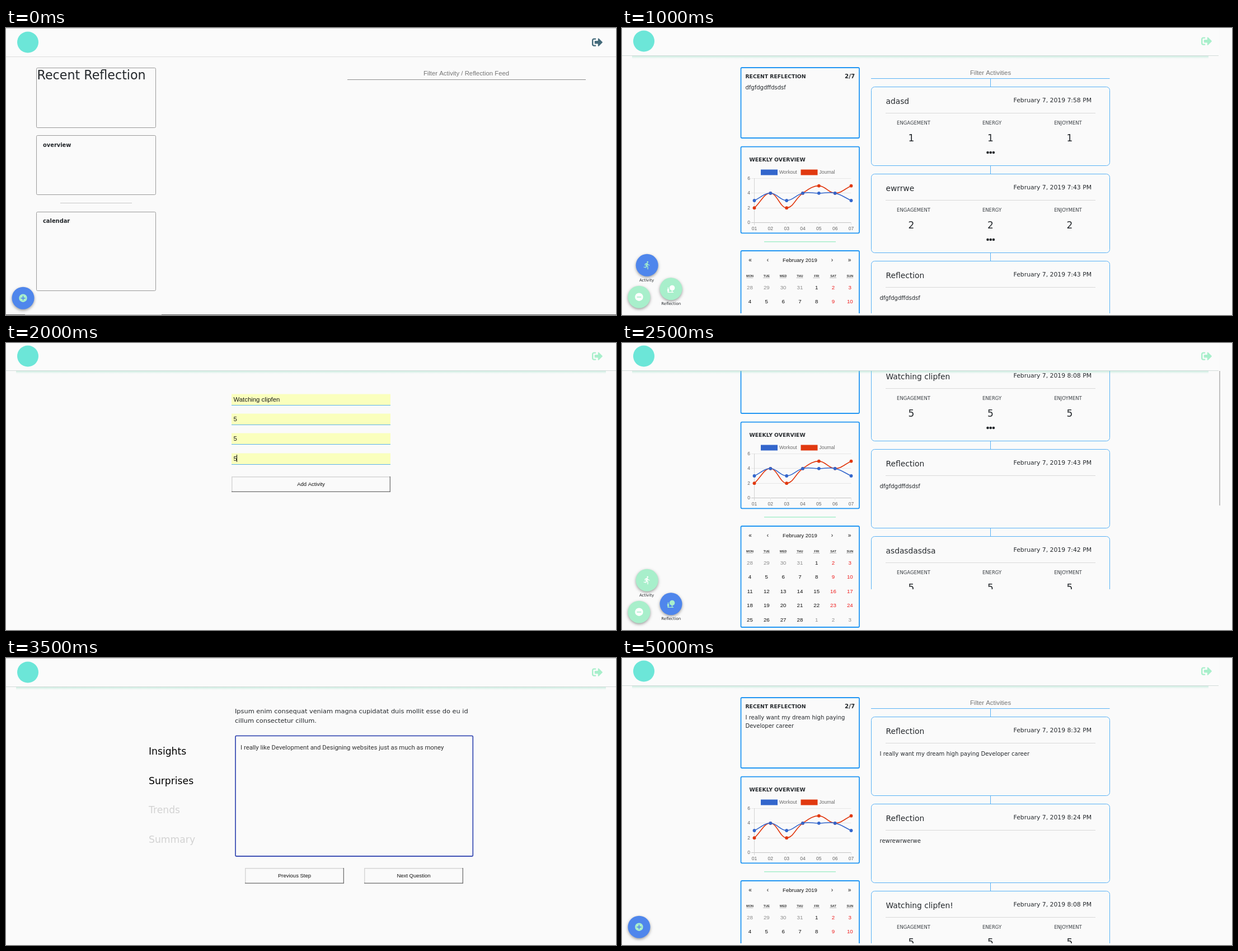
Animation, 1090 px wide and 514 px high, one loop 5500 ms. Source, as an HTML page with a canvas:

```html
<!DOCTYPE html>
<html lang="en">
<head>
<meta charset="utf-8">
<title>Reflection journal</title>
<style>
  html, body { margin: 0; width: 100%; height: 100%; overflow: hidden; background: #fafafa; }
  canvas { display: block; }
</style>
</head>
<body>
<canvas id="stage" width="1090" height="514"></canvas>
<script>
const ctx = document.getElementById('stage').getContext('2d');
const W = 1090, H = 514, STEP = 500, LOOP = 5500;
const BG = '#fafafa', INK = '#24282c', MINT = '#a8efcb', BLUE = '#4f86ec', EDGE = '#2196f3', THIN = '#58b1f5';
const VERDANA = '"DejaVu Sans", Verdana, sans-serif';
const ARIAL = '"Liberation Sans", Arial, sans-serif';
const ROBOTO = 'Roboto, sans-serif';

const LOGOUT = new Path2D('M497 273L329 441c-15 15-41 4.500-41-17v-96H152c-13.300 0-24-10.700-24-24v-96c0-13.300 10.700-24 24-24h136V88c0-21.400 25.900-32 41-17l168 168c9.300 9.400 9.300 24.600 0 34zM192 436v-40c0-6.600-5.400-12-12-12H96c-17.700 0-32-14.300-32-32V160c0-17.700 14.300-32 32-32h84c6.600 0 12-5.400 12-12V76c0-6.600-5.400-12-12-12H96c-53 0-96 43-96 96v192c0 53 43 96 96 96h84c6.600 0 12-5.400 12-12z');
const RUNNER = new Path2D('M13.490 5.480c1.100 0 2-.9 2-2s-.9-2-2-2-2 .9-2 2 .9 2 2 2zm-3.600 13.900l1-4.400 2.100 2v6h2v-7.500l-2.100-2 .6-3c1.300 1.500 3.300 2.500 5.500 2.500v-2c-1.900 0-3.500-1-4.300-2.400l-1-1.600c-.4-.6-1-1-1.700-1-.3 0-.5.1-.8.1l-5.200 2.200v4.700h2v-3.400l1.800-.7-1.600 8.100-4.900-1-.4 2 7 1.400z');
const TREE = new Path2D('M22.170 9.170c0-3.870-3.130-7-7-7s-7 3.130-7 7c0 3.470 2.520 6.340 5.830 6.890V20H6v-3h1v-4c0-.55-.45-1-1-1H3c-.55 0-1 .45-1 1v4h1v5h16v-2h-3v-3.880c3.470-.41 6.170-3.360 6.170-6.950zM4.500 11c.83 0 1.500-.67 1.500-1.500S5.330 8 4.500 8 3 8.670 3 9.500 3.670 11 4.500 11z');

function text(str, x, y, size, { family = VERDANA, color = INK, align = 'left', weight = 'normal' } = {}) {
  ctx.font = `${weight} ${size}px ${family}`;
  ctx.fillStyle = color;
  ctx.textAlign = align;
  ctx.fillText(str, x, y);
}

function rect(x, y, w, h, color) {
  ctx.fillStyle = color;
  ctx.fillRect(x, y, w, h);
}

function line(x1, y1, x2, y2, color, width = 1) {
  ctx.strokeStyle = color;
  ctx.lineWidth = width;
  ctx.beginPath();
  ctx.moveTo(x1, y1);
  ctx.lineTo(x2, y2);
  ctx.stroke();
}

function box(x, y, right, bottom, color, width, radius) {
  ctx.strokeStyle = color;
  ctx.lineWidth = width;
  ctx.beginPath();
  ctx.roundRect(x, y, right - x, bottom - y, radius);
  ctx.stroke();
}

function disc(x, y, r, color) {
  ctx.fillStyle = color;
  ctx.beginPath();
  ctx.arc(x, y, r, 0, Math.PI * 2);
  ctx.fill();
}

function icon(path, x, y, scale, color) {
  ctx.save();
  ctx.translate(x, y);
  ctx.scale(scale, scale);
  ctx.fillStyle = color;
  ctx.fill(path);
  ctx.restore();
}

// Runs a drawing inside a clip, moved vertically by dy.
function within(x, y, w, h, dy, draw) {
  ctx.save();
  ctx.beginPath();
  ctx.rect(x, y, w, h);
  ctx.clip();
  ctx.translate(0, dy);
  draw();
  ctx.restore();
}

function header(width, iconX, plain = false) {
  rect(0, 0, width, 49, '#fbfbfb');
  if (!plain) {
    const glow = ctx.createLinearGradient(0, 50, 0, 55);
    glow.addColorStop(0, 'rgba(150, 220, 195, .45)');
    glow.addColorStop(1, 'rgba(150, 220, 195, 0)');
    rect(18, 50, width - 36, 5, glow);
  }
  rect(0, 49, width, 1, plain ? '#dcdcdc' : '#d3dbd9');
  disc(39, 23.5, 19, '#6ce6d8');
  icon(LOGOUT, iconX, 14, 0.0375, plain ? '#456b7b' : MINT);
}

function fab(x, y, color) {
  ctx.save();
  ctx.shadowColor = 'rgba(0, 0, 0, .38)';
  ctx.shadowBlur = 5;
  ctx.shadowOffsetY = 2;
  disc(x, y, 20, color);
  ctx.restore();
}

function mainFab(open) {
  const face = open ? MINT : BLUE;
  fab(30.5, 481.7, face);
  disc(30.5, 481.7, 7.2, open ? '#fff' : MINT);
  rect(26.5, 481, 8, 1.6, face);
  if (!open) rect(29.7, 477.7, 1.6, 8, face);
}

function menu(active) {
  const items = [['Activity', 44.7, 424.8, RUNNER, 44], ['Reflection', 87.5, 467.3, TREE, 87.7]];
  for (const [name, x, y, path, labelX] of items) {
    const on = name === active;
    fab(x, y, on ? BLUE : MINT);
    icon(path, x - 8, y - 8, 0.67, on ? MINT : '#fff');
    text(name, labelX, y + 29, 7, { align: 'center' });
  }
  mainFab(true);
}

// Smooth curve whose handles follow the chord between neighbouring points.
function spline(points, color) {
  const handles = points.map((p, i) => {
    const a = points[i - 1] || p, b = points[i + 1] || p;
    const before = Math.hypot(p.x - a.x, p.y - a.y), after = Math.hypot(b.x - p.x, b.y - p.y);
    const ka = 0.4 * before / (before + after), kb = 0.4 * after / (before + after);
    const dx = b.x - a.x, dy = b.y - a.y;
    return { inX: p.x - ka * dx, inY: p.y - ka * dy, outX: p.x + kb * dx, outY: p.y + kb * dy };
  });
  ctx.strokeStyle = color;
  ctx.lineWidth = 1.6;
  ctx.beginPath();
  ctx.moveTo(points[0].x, points[0].y);
  for (let i = 1; i < points.length; i++) {
    const from = handles[i - 1], to = handles[i];
    ctx.bezierCurveTo(from.outX, from.outY, to.inX, to.inY, points[i].x, points[i].y);
  }
  ctx.stroke();
  points.forEach(p => disc(p.x, p.y, 2.9, color));
}

function chart() {
  const label = { family: ARIAL, color: '#666' };
  const colX = i => 236.5 + 28.83 * i, rowY = v => 348.5 - 13.17 * v;
  rect(248, 253.5, 30, 10, '#3366cc');
  text('Workout', 281, 261, 8.5, label);
  rect(319.5, 253.5, 30, 10, '#e13910');
  text('Journal', 352.5, 261, 8.5, label);
  for (const v of [0, 2, 4, 6]) {
    const y = Math.floor(rowY(v)) + 0.5;
    line(231, y, 409.5, y, v ? '#e6e6e6' : '#c4c4c4');
    text(v, 229, y + 2.5, 8.5, { ...label, align: 'right' });
  }
  for (let i = 0; i < 7; i++) {
    line(colX(i), i ? 348 : 269, colX(i), 353, i ? '#e6e6e6' : '#d4d4d4');
    text('0' + (i + 1), colX(i), 362, 8.5, { ...label, align: 'center' });
  }
  const toPoints = values => values.map((v, i) => ({ x: colX(i), y: rowY(v) }));
  spline(toPoints([2, 4, 2, 4, 5, 4, 5]), '#e13910');
  spline(toPoints([3, 4, 3, 4, 4, 4, 3]), '#3366cc');
}

function calendar() {
  const opts = { family: ARIAL, align: 'center', color: '#111' };
  const colX = i => 228.5 + 29.8 * i;
  text('February 2019', 318, 418.5, 9.5, opts);
  [['«', 229], ['‹', 260.5], ['›', 375.5], ['»', 406.5]].forEach(([s, x]) => text(s, x, 418.5, 10, opts));
  'MON TUE WED THU FRI SAT SUN'.split(' ').forEach((day, i) => {
    text(day, colX(i), 446, 5.5, { ...opts, weight: 'bold', color: '#333' });
    ctx.setLineDash([1, 0.7]);
    line(colX(i) - 6, 447.5, colX(i) + 6, 447.5, '#777', 0.8);
    ctx.setLineDash([]);
  });
  for (let i = 0; i < 35; i++) {
    const offset = i - 3, inside = offset >= 1 && offset <= 28;
    const day = offset < 1 ? offset + 31 : inside ? offset : offset - 28;
    const color = !inside ? '#8c8c8c' : i % 7 > 4 ? '#ee1c1c' : '#111';
    text(day, colX(i % 7), 467.5 + 25.6 * Math.floor(i / 7), 9.7, { ...opts, color });
  }
}

function sidebar(recent) {
  const bold = { weight: 'bold' };
  box(212.5, 71, 424, 197, EDGE, 1.8, 2);
  text('RECENT REFLECTION', 220.5, 89.7, 9.26, bold);
  text('2/7', 416, 89.7, 10.2, { ...bold, align: 'right' });
  recent.forEach((row, i) => text(row, 220.5, 109.5 + 15 * i, 10));
  box(212.5, 212.7, 424, 367.3, EDGE, 1.8, 2);
  text('WEEKLY OVERVIEW', 227.5, 239, 9.3, bold);
  chart();
  line(254, 382.7, 382, 382.7, MINT, 1.6);
  box(212.5, 399, 424, 580, EDGE, 1.8, 2);
  calendar();
}

function card({ title, time, score, note }, i) {
  const top = 105.5 + 156 * i;
  line(658.5, top - 15, 658.5, top, THIN);
  box(445.5, top, 871.5, top + 141, THIN, 1, 6);
  text(title, 471.5, top + 30.3, 13.8);
  text(`February 7, 2019 ${time} PM`, 839, top + 27.3, 10.8, { align: 'right' });
  line(471, top + 47, 846, top + 47, '#d9d9d9');
  if (note) {
    text(note, 460.5, top + 69, 10);
    return;
  }
  [['ENGAGEMENT', 521, 517], ['ENERGY', 661, 658.5], ['ENJOYMENT', 797, 800]].forEach(([name, x, scoreX]) => {
    text(name, x, top + 67.3, 8.45, { align: 'center', color: '#3a3f44' });
    text(score, scoreX, top + 97, 17, { align: 'center' });
  });
  [653.5, 658.7, 663.9].forEach(x => disc(x, top + 117.5, 2.3, INK));
}

function dashboard({ recent, cards, active, dy = 0, scroll = 0, feedEnd = 511 }) {
  within(0, 0, W, 511 + dy, dy, () => {
    within(0, 0, W, 511, -scroll, () => sidebar(recent));
    within(430, 0, 460, feedEnd, -scroll, () => {
      text('Filter Activities', 658.5, 83.5, 11.35, { family: ARIAL, color: '#757575', align: 'center' });
      line(445, 90.5, 871.5, 90.5, THIN);
      cards.forEach(card);
    });
    if (scroll) rect(1067, 50, 2, 241, '#c1c1c1');
    header(1066, 1035);
    active ? menu(active) : mainFab(false);
  });
}

// Pages shown two pixels lower also reveal the window's top edge.
function page(dy, draw, plain) {
  if (dy) rect(0, 0, W, 1, '#cfcfcf');
  within(0, dy ? 1 : 0, W, H, dy, () => {
    header(W, 1047, plain);
    draw();
  });
}

function button(label, x, y, w) {
  rect(x, y, w, 28, '#747474');
  rect(x, y, w - 1.5, 26.5, '#d6d6d6');
  rect(x + 1.5, y + 1.5, w - 3, 25, BG);
  text(label, x + w / 2, y + 17, 9.5, { family: ARIAL, color: '#111', align: 'center' });
}

function emptyHome() {
  page(2, () => {
    const grey = '#999', bold = { weight: 'bold' };
    box(54.5, 69.5, 267.5, 176.5, grey, 1, 2);
    text('Recent Reflection', 55.5, 90, 22.2);
    box(54.5, 190.5, 267.5, 296.5, grey, 1, 2);
    text('overview', 66, 210.5, 9.9, bold);
    line(97, 311.5, 225, 311.5, '#c8c8c8');
    box(54.5, 327.5, 267.5, 468.5, grey, 1, 2);
    text('calendar', 66, 346.5, 9.9, bold);
    text('Filter Activity / Reflection Feed', 822.5, 83.3, 11.35, { family: ARIAL, color: '#757575', align: 'center' });
    line(610, 90.5, 1036, 90.5, '#8c8c8c');
    mainFab(false);
  }, true);
  rect(0, 513, W, 1, '#5a5a5a');
  rect(34, 513, 244, 1, '#b5b5b5');
}

function activityForm(values, dy) {
  const hints = ['Activity', 'Engagement', 'Energy', 'Enjoyment'];
  page(dy, () => {
    hints.forEach((hint, i) => {
      const y = Math.round(111 + 35.2 * i), value = values[i];
      if (value) rect(403, y - 19.5, 284, 19.5, '#faffbd');
      rect(403, y, 284, 1, '#5cb3e8');
      text(value || hint, 406.5, y - 6, 11.35, { family: ARIAL, color: value ? '#1a1a1a' : '#757575' });
    });
    if (values[3]) rect(412, 200, 1, 13, '#111');
    button('Add Activity', 403, 239, 284);
  });
}

function reflectionForm(step, answer, dy, next = 'Next Question') {
  page(dy, () => {
    text('Ipsum enim consequat veniam magna cupidatat duis mollit esse do eu id', 409, 97, 11.35);
    text('cillum consectetur cillum.', 409, 114, 11.35);
    ['Insights', 'Surprises', 'Trends', 'Summary'].forEach((name, i) =>
      text(name, 255, 171 + 52.6 * i, 17.2, { color: i < step ? '#000' : '#d3d3d3' }));
    box(410, 137.3, 834.3, 353, '#3f51b5', 1.8, 2);
    text(answer, 419, 162, 11.35, { family: ROBOTO, color: '#333' });
    button('Previous Step', 427, 374, 177);
    button(next, 640, 374, 177);
  });
}

const DREAM = 'I really want my dream high paying Developer career';
const WATCHING = 'Watching clipfen';
const SCRIBBLE = 'dfgfdgdffdsdsf';
const oldNote = { title: 'Reflection', time: '7:43', note: SCRIBBLE };
const firstCards = [{ title: 'adasd', time: '7:58', score: 1 }, { title: 'ewrrwe', time: '7:43', score: 2 }, oldNote];
const laterCards = [{ title: WATCHING, time: '8:08', score: 5 }, oldNote, { title: 'asdasdasdsa', time: '7:42', score: 5 }];
const finalCards = [
  { title: 'Reflection', time: '8:32', note: DREAM },
  { title: 'Reflection', time: '8:24', note: 'rewrewrwerwe' },
  { title: WATCHING + '!', time: '8:08', score: 5 }
];

const scenes = [
  emptyHome,
  () => dashboard({ recent: [SCRIBBLE], cards: firstCards, dy: 1 }),
  () => dashboard({ recent: [SCRIBBLE], cards: firstCards, active: 'Activity' }),
  () => activityForm([WATCHING], 2),
  () => activityForm([WATCHING, '5', '5', '5'], 0),
  () => dashboard({ recent: [SCRIBBLE], cards: laterCards, active: 'Reflection', scroll: 71, feedEnd: 441 }),
  () => reflectionForm(1, '', 0),
  () => reflectionForm(2, 'I really like Development and Designing websites just as much as money', 2),
  () => reflectionForm(3, '', 2),
  () => reflectionForm(4, DREAM, 0, 'Submit Reflection'),
  () => dashboard({ recent: ['I really want my dream high paying', 'Developer career'], cards: finalCards })
];

function render() {
  rect(0, 0, W, H, BG);
  scenes[Math.floor(performance.now() % LOOP / STEP)]();
  requestAnimationFrame(render);
}
render();
</script>
</body>
</html>
```
